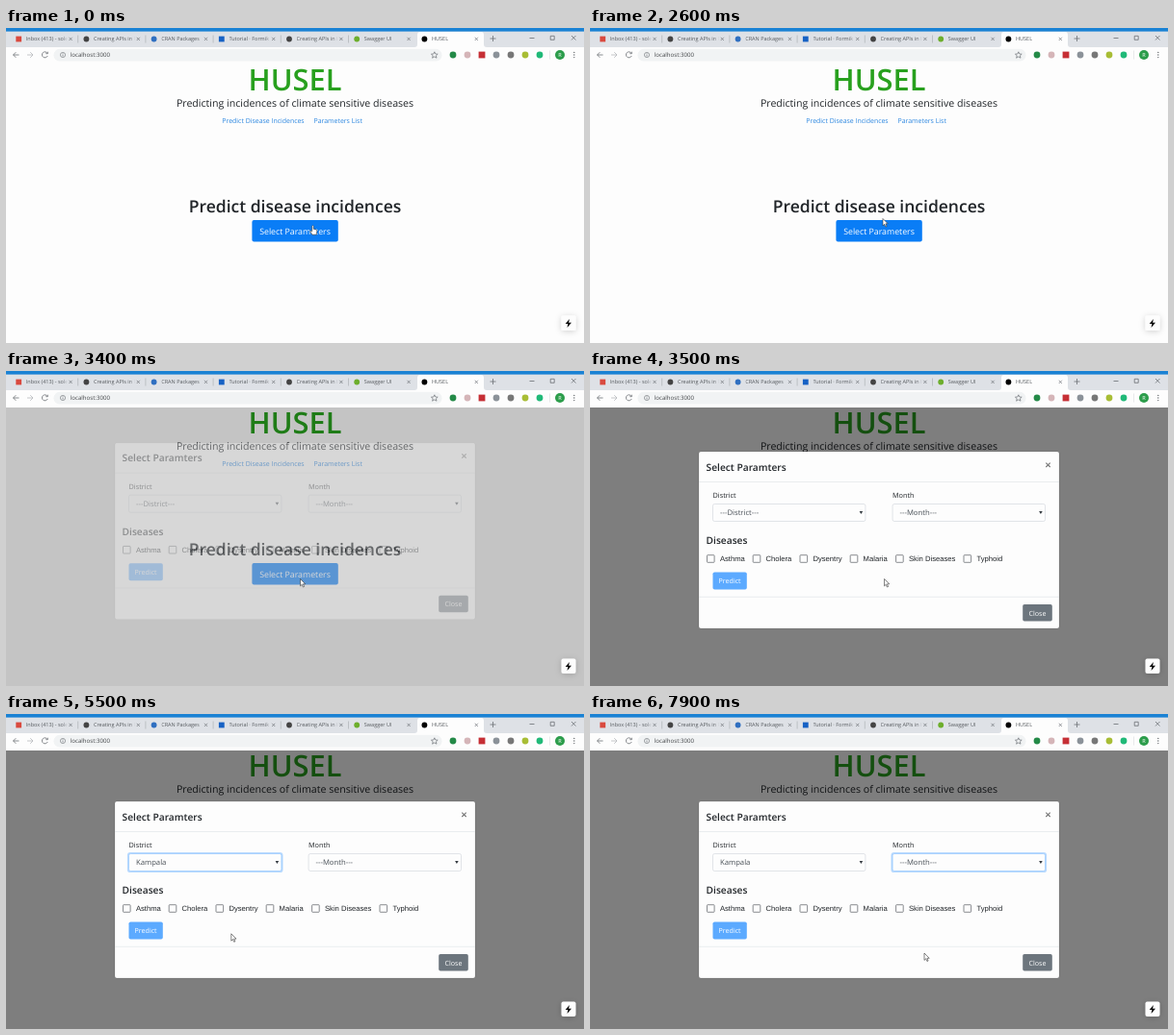
An HTML page that plays this animation: 600x328 px, repeating every 8 s.

```html
<!DOCTYPE html>
<html lang="en">
<head>
<meta charset="utf-8">
<title>HUSEL</title>
<style>
html, body { margin: 0; width: 100%; height: 100%; overflow: hidden; background: #fff; }
svg { display: block; width: 600px; height: 328px; font-family: "Open Sans", "Noto Sans", sans-serif; text-rendering: geometricPrecision; }
.mid { text-anchor: middle; }
.semi { font-weight: 600; }
.line { fill: none; stroke: #6b6f74; stroke-width: .8; }
.link { fill: #2a86e0; font-size: 6.95px; }
.tab { font-size: 5.5px; fill: #55595d; }
.label { font-size: 7.3px; }
.value { font-size: 7.7px; fill: #495057; }
.check { font: 7.65px "Liberation Sans", Arial, sans-serif; }
.field { fill: #fdfdfd; stroke: #ced4da; stroke-width: .6; }
.field.on { stroke: #80bdff; }
.ring { fill: none; stroke: #007bff; stroke-opacity: .28; stroke-width: 1.6; }
</style>
</head>
<body>
<svg viewBox="0 0 600 328">
  <defs>
    <linearGradient id="fade"><stop offset=".88" stop-color="#fff"/><stop offset="1" stop-color="#fff" stop-opacity="0"/></linearGradient>
    <mask id="tabMask" maskUnits="userSpaceOnUse" x="0" y="0" width="43" height="20"><rect width="43" height="20" fill="url(#fade)"/></mask>
    <filter id="soft" x="-80%" y="-80%" width="260%" height="260%"><feDropShadow dx="0" dy="1" stdDeviation="3" flood-opacity=".18"/></filter>
  </defs>

  <g fill="#212529" class="mid">
    <rect width="600" height="328" fill="#fdfdfd"/>
    <text x="300" y="64.8" class="semi" font-size="30.8" fill="#28a01e">HUSEL</text>
    <text x="300" y="81.8" font-size="10.62">Predicting incidences of climate sensitive diseases</text>
    <text x="267" y="99.3" class="link">Predict Disease Incidences</text>
    <text x="344.7" y="99.3" class="link">Parameters List</text>
    <text x="300" y="192.2" class="semi" font-size="17.5">Predict disease incidences</text>
    <rect x="255.4" y="200" width="89.4" height="22.4" rx="2" fill="#0a7df6"/>
    <text x="300" y="214.5" font-size="8.78" fill="#fff">Select Parameters</text>
  </g>

  <rect id="shade" y="37" width="600" height="291"/>

  <g id="modal" fill="#212529">
    <rect x="113" y="91" width="374" height="184" rx="2" fill="#fdfdfd" stroke="#000" stroke-opacity=".2" stroke-width=".5"/>
    <path d="M113 122.5h374M113 242.3h374" stroke="#dee2e6" stroke-width=".6"/>
    <text x="120.6" y="110.6" class="semi" font-size="10.2">Select Paramters</text>
    <path d="M473.3 102.6l4.4 4.4m0-4.4l-4.4 4.4" stroke="#777" stroke-width="1.1"/>
    <text x="127.5" y="139" class="label">District</text>
    <text x="314" y="139" class="label">Month</text>
    <rect id="districtRing" class="ring" x="126.7" y="144.7" width="160" height="19.6" rx="2.4"/>
    <rect id="district" class="field" x="127.5" y="145.5" width="158.4" height="18" rx="1.8"/>
    <text id="choice" x="135" y="157.4" class="value"></text>
    <rect id="monthRing" class="ring" x="313.3" y="144.7" width="160" height="19.6" rx="2.4"/>
    <rect id="month" class="field" x="314.1" y="145.5" width="158.4" height="18" rx="1.8"/>
    <text x="321.5" y="157.4" class="value">---Month---</text>
    <path d="M279.6 153h3.6l-1.8 3zM466.1 153h3.6l-1.8 3z" fill="#343a40"/>
    <text x="120.6" y="187" class="semi" font-size="10.2">Diseases</text>
    <g id="checks"></g>
    <rect x="127.5" y="216.5" width="35.3" height="18" rx="1.8" fill="#5caaff"/>
    <text x="145.1" y="228.2" class="mid" font-size="7.1" fill="#fff">Predict</text>
    <rect x="449.2" y="250" width="30.6" height="17.6" rx="1.8" fill="#6c757d"/>
    <text x="464.5" y="261.6" class="mid" font-size="7.1" fill="#fff">Close</text>
  </g>

  <g>
    <rect width="600" height="38" fill="#fdfdfd"/>
    <rect width="600" height="20" fill="#dee1e6"/>
    <rect width="600" height="3.6" fill="#1a82d4"/>
    <path d="M424 20q3 0 3-3V7q0-3 3-3h63q3 0 3 3v10q0 3 3 3z" fill="#fdfdfd"/>
    <g id="tabs"></g>
    <path class="line" d="M502.5 11h6m-3-3v6M543.5 10.5h5M565.2 8.3h4v4h-4zM587 8l4.500 4.500m0-4.500l-4.500 4.500"/>
    <path class="line" d="M13.5 28h-6m2.800-2.800L7.500 28l2.800 2.800M43 26.300a3 3 0 1 0 .2 2.700M43.300 24.700v2h-2"/>
    <path class="line" d="M22 28h6m-2.800-2.800L28 28l-2.800 2.800" style="stroke:#b5b8bc"/>
    <rect x="49.5" y="21.8" width="403" height="12.8" rx="6.4" fill="#f1f3f4"/>
    <circle class="line" cx="59" cy="28" r="2.6" style="stroke-width:.6"/>
    <path class="line" d="M59 27.5v2M59 26.200v.6" style="stroke-width:.7"/>
    <text x="66.8" y="30.2" font-size="6.1" fill="#404346">localhost:3000</text>
    <path class="line" style="stroke-width:.7" d="M444.800 24.800l1 2.200 2.400.2-1.800 1.600.6 2.400-2.200-1.300-2.200 1.300.6-2.400-1.800-1.600 2.400-.2z"/>
    <g id="badges"></g>
    <path d="M564.500 23.500v9" stroke="#dadce0" stroke-width=".6"/>
    <circle cx="575" cy="28" r="5" fill="#2c9d4b"/>
    <text x="575" y="30.1" class="mid" font-size="5.6" fill="#fff">R</text>
    <path d="M589.800 25.400h.01m-.01 2.600h.01m-.01 2.600h.01" stroke="#5f6368" stroke-width="1.400" stroke-linecap="round"/>
  </g>

  <rect x="576.5" y="299.5" width="15" height="15.5" rx="2" fill="#fdfdfd" filter="url(#soft)"/>
  <path d="M584.900 303l-4.200 5h2.700l-.9 4 4.500-5.200h-2.900z" fill="#000"/>

  <g id="cursor" stroke="#333" stroke-width=".6" stroke-linejoin="round" fill="#fff">
    <path id="arrow" d="M0 0v7.400l1.700-1.600 1.200 2.700 1.200-.5-1.200-2.700h2.300z"/>
    <path id="hand" d="M-.8.800q.8-1.400 1.600 0v3l2.600.6q1 .3.900 1.500l-.6 3.800h-4.300l-2.300-3.500q.4-1 2.100.2z"/>
  </g>
</svg>
<script>
const $ = id => document.getElementById(id);
const LOOP = 8000, STEP = 100;

const icon = (x, y, r, color, square) => square
  ? `<rect x="${x - r}" y="${y - r}" width="${2 * r}" height="${2 * r}" fill="${color}"/>`
  : `<circle cx="${x}" cy="${y}" r="${r}" fill="${color}"/>`;

const tabs = [
  ["Inbox (413) - solen", "#d94a3f", 1], ["Creating APIs in R", "#444"],
  ["CRAN Packages", "#2f6fc0"], ["Tutorial · Formik", "#1762c4", 1],
  ["Creating APIs in R", "#444"], ["Swagger UI", "#6dae2c"], ["HUSEL", "#000"]
];
$("tabs").innerHTML = tabs.map(([name, color, square], i) => {
  const x = 13.2 + i * 70.2;
  const split = i < 5 ? `<path d="M${x + 61.5} 7.5v8" stroke="#9a9ea3" stroke-width=".5"/>` : "";
  return icon(x, 11.5, 2.9, color, square) +
    `<g transform="translate(${x + 7.6})" mask="url(#tabMask)"><text y="13.4" class="tab">${name}</text></g>` +
    `<path class="line" d="M${x + 52.3} 9.800l3.200 3.200m0-3.200l-3.200 3.200" style="stroke-width:.7"/>` + split;
}).join("");

$("badges").innerHTML = ["#248a48", "#d5b5b8", "#c62f35", "#8b9299", "#777", "#a8bd35", "#20b978"]
  .map((color, i) => icon(464 + i * 15, 28, 3.4, color, i == 2)).join("");

$("checks").innerHTML = Object.entries({
  Asthma: 121.5, Cholera: 169.2, Dysentry: 218, Malaria: 270.2, "Skin Diseases": 317.6, Typhoid: 388
}).map(([name, x]) =>
  `<rect class="line" x="${x}" y="198.7" width="7.6" height="7.6" rx=".6"/>` +
  `<text x="${x + 13.4}" y="205.2" class="check">${name}</text>`).join("");

// Pointer stops: time, x, y
const stops = [
  [0, 318.5, 205.5], [300, 318.5, 205.5], [1300, 305, 151], [1900, 305, 151],
  [2600, 304, 198.5], [3100, 305.5, 216.5], [3500, 305.5, 216.5], [4100, 274, 153],
  [4400, 274, 153], [5300, 233.8, 228.8], [5600, 233.8, 228.8],
  [6500, 420, 154], [6800, 420, 154], [7900, 347, 249], [LOOP, 347, 249]
];
const clamp = v => Math.min(1, Math.max(0, v));
const smooth = k => k * k * (3 - 2 * k);

function pointer(t) {
  const i = stops.findIndex(s => s[0] > t);
  const [t0, x0, y0] = stops[i - 1], [t1, x1, y1] = stops[i];
  const k = smooth((t - t0) / (t1 - t0));
  return [x0 + (x1 - x0) * k, y0 + (y1 - y0) * k];
}

function focus(id, on) {
  $(id).classList.toggle("on", on);
  $(id + "Ring").style.opacity = on ? 1 : 0;
}

function draw(t) {
  const [x, y] = pointer(t);
  const hand = t < 3300 && x > 255 && x < 345 && y > 200 && y < 223;
  $("cursor").setAttribute("transform", `translate(${x} ${y})`);
  $("arrow").style.opacity = hand ? 0 : 1;
  $("hand").style.opacity = hand ? 1 : 0;

  const drop = 22 * (1 - clamp((t - 3350) / 300)) ** 1.65;
  $("shade").style.opacity = clamp((t - 3332) / 150) / 2;
  $("modal").style.opacity = clamp((t - 3350) / 150);
  $("modal").setAttribute("transform", `translate(0 ${-drop})`);

  focus("district", t >= 4300 && t < 6500);
  focus("month", t >= 6500);
  $("choice").textContent = t < 5300 ? "---District---" : "Kampala";
}

function tick() {
  const t = performance.now() % LOOP;
  draw(Math.floor(t / STEP) * STEP);
  requestAnimationFrame(tick);
}
tick();
</script>
</body>
</html>
```
